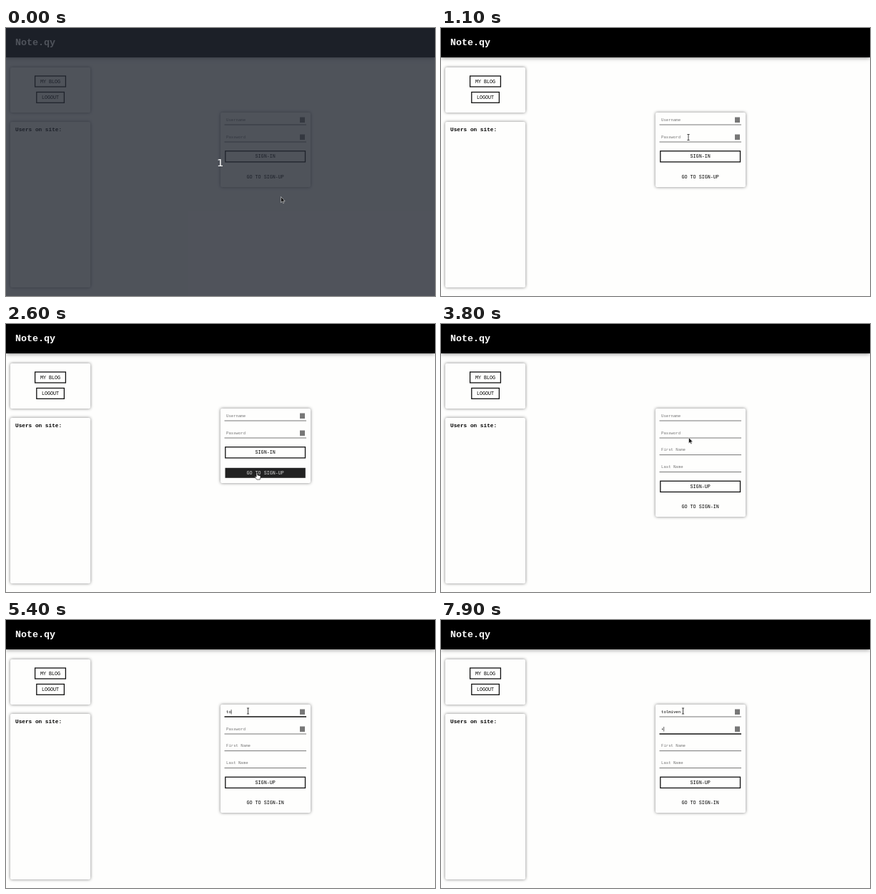
Recreate the animation shown at these times as an HTML page. Size 600 by 374 pixels, loop 8 s.

```html
<!DOCTYPE html>
<html lang="en">
<head>
<meta charset="utf-8">
<title>Sign-up form</title>
<style>
  html, body { margin: 0; width: 100%; height: 100%; overflow: hidden; background: #fefefd; }
  #stage { position: relative; width: 600px; height: 374px; overflow: hidden; background: #fefefd; }
  header, .card, svg { position: absolute; }
  header { left: 0; top: 0; width: 600px; height: 41px; background: #000; box-shadow: 0 0 6px #666; }
  .card { background: #fefefd; border-radius: 2px; box-shadow: 0 0 4px #808080; }
  svg { left: 0; top: 0; }
  text { font: 6.7px "Liberation Mono", monospace; white-space: pre; }
  .btn text { text-anchor: middle; }
  .btn rect { fill: none; stroke: #111; stroke-width: 1.3; }
  .btn.plain rect { stroke: none; }
  .btn.hover rect { fill: #222; stroke: #222; }
  .btn.plain.hover rect { stroke: none; }
  .btn.hover text { fill: #d8d8d8; }
  .field text { font-size: 5.67px; fill: #000; }
  .field.empty text { fill: #757575; }
  .field .line { stroke: #777; stroke-width: 1; }
  .field.focus .line { stroke: #111; stroke-width: 1.5; }
  .caret { stroke: #000; stroke-width: .6; }
</style>
</head>
<body>
<div id="stage">
  <header></header>
  <div class="card" style="left:6px;top:54.5px;width:112px;height:63px"></div>
  <div class="card" style="left:6px;top:130.5px;width:112px;height:231px"></div>
  <div class="card" id="form" style="left:300px;top:117.5px;width:125.5px;height:104px"></div>
  <svg id="art" width="600" height="374" viewBox="0 0 600 374">
    <text x="13" y="24.3" fill="#fff" style="font-size:13.35px;font-weight:bold">Note.qy</text>
    <text x="13" y="144" style="font-size:7.75px;font-weight:bold">Users on site:</text>
    <g id="ui"></g>
    <g id="veil">
      <rect width="600" height="374" fill="#242832" fill-opacity=".8"/>
      <text x="299.5" y="192.5" fill="#fff" text-anchor="middle" style="font:14.5px 'DejaVu Sans',sans-serif">1</text>
    </g>
    <g id="cursor">
      <path id="arrow" d="M0 0V8L1.9 6.4L3.1 9.1L4.4 8.5L3.2 6H5.6Z" fill="#111" stroke="#fff" stroke-width=".5"/>
      <path id="beam" d="M-1.6-4H1.6M0-4V4M-1.6 4H1.6" fill="none" stroke="#333" stroke-width=".9"/>
      <path id="hand" d="M-.9-1.4Q0-2.6.8-1.4V1.4L4.3 2.3Q5.3 2.7 5 4.2L4.2 7.6H-.2L-2.9 4Q-2.7 2.7-.9 3.8Z" fill="#fff" stroke="#111" stroke-width=".6"/>
    </g>
  </svg>
</div>
<script>
const LOOP = 8000, STEP = 100, CHAR = 3.4;
const USER = 'tolmiven';
const $ = id => document.getElementById(id);
const ui = $('ui'), form = $('form');

// start, end, target x, target y
const moves = [
  [800, 1100, 346, 152.5],
  [1300, 1600, 346, 141],
  [1900, 1900, 348, 143],
  [2100, 2100, 338, 130],
  [2200, 2600, 351, 209.5],
  [3000, 3000, 351, 210.5],
  [3500, 3800, 346.5, 158.5],
  [4000, 4700, 338.5, 127]
];
// time, characters typed
const typing = [[5300, 1], [5400, 2], [5800, 3], [6400, 5], [6500, 6], [6700, 7], [7000, 8]];
// caret hidden from, to
const blinks = [[5100, 5300], [7600, 7900]];

function pointer(t) {
  let x = 384.5, y = 235.5;
  for (const [a, b, tx, ty] of moves) {
    if (t < a) break;
    const p = Math.min(1, (t - a + STEP) / (b - a + STEP));
    const k = p * p * (3 - 2 * p);
    x += (tx - x) * k;
    y += (ty - y) * k;
  }
  return { x, y };
}

const inside = (p, x, y, w, h) => p.x >= x && p.x <= x + w && p.y >= y && p.y <= y + h;

function button(label, x, y, w, h, p, plain) {
  const over = inside(p, x, y, w, h);
  if (over) p.kind = 'hand';
  return `<g class="btn${plain ? ' plain' : ''}${over ? ' hover' : ''}">
    <rect x="${x}" y="${y}" width="${w}" height="${h}"/>
    <text x="${x + w / 2}" y="${y + h / 2 + 2}">${label}</text></g>`;
}

function field(hint, value, y, p, { focus, caret, icon }) {
  if (inside(p, 305, y - 14, 115, 12.5)) p.kind = 'beam';
  const cx = 308.3 + value.length * CHAR;
  return `<g class="field${value ? '' : ' empty'}${focus ? ' focus' : ''}">
    <text x="308" y="${y - 5.2}">${value || hint}</text>
    <path class="line" d="M305.5 ${y}H420"/>
    ${icon ? `<rect x="411" y="${y - 10.5}" width="7" height="7.5" fill="#777"/>` : ''}
    ${focus && caret ? `<path class="caret" d="M${cx} ${y - 10}v6.5"/>` : ''}</g>`;
}

function render(time) {
  const t = Math.floor(time / STEP) * STEP;
  const p = { ...pointer(t), kind: 'arrow' };
  const signUp = t >= 3500;
  const focus = t >= 7100 ? 1 : t >= 4700 ? 0 : -1;
  const caret = !blinks.some(([a, b]) => t >= a && t < b);
  const icon = !signUp || t >= 4300;
  const count = typing.reduce((n, [at, c]) => t >= at ? c : n, 0);
  const drop = signUp ? 47.5 : 0;

  let out = button('MY BLOG', 40.6, 67, 42.8, 15, p)
    + button('LOGOUT', 42.8, 89.5, 38.6, 14.8, p)
    + field('Username', USER.slice(0, count), 135, p, { focus: focus === 0, caret, icon })
    + field('Password', t >= 7900 ? '•' : '', 159, p, { focus: focus === 1, caret, icon });
  if (signUp) out += field('First Name', '', 182.6, p, {}) + field('Last Name', '', 206.5, p, {});
  out += button(signUp ? 'SIGN-UP' : 'SIGN-IN', 306.8, 171.7 + drop, 111.7, 15.2, p)
    + button(signUp ? 'GO TO SIGN-IN' : 'GO TO SIGN-UP', 306.5, 200.8 + drop, 112.3, 14, p, true);
  ui.innerHTML = out;

  form.style.height = 104 + drop + 'px';
  $('veil').style.display = t < 200 ? '' : 'none';
  for (const kind of ['arrow', 'beam', 'hand']) $(kind).style.display = kind === p.kind ? '' : 'none';
  $('cursor').setAttribute('transform', `translate(${p.x} ${p.y})`);
}

const start = performance.now();
let shown = -1;
function tick() {
  const time = (performance.now() - start) % LOOP;
  const step = Math.floor(time / STEP);
  if (step !== shown) render(time);
  shown = step;
  requestAnimationFrame(tick);
}
tick();
</script>
</body>
</html>
```
